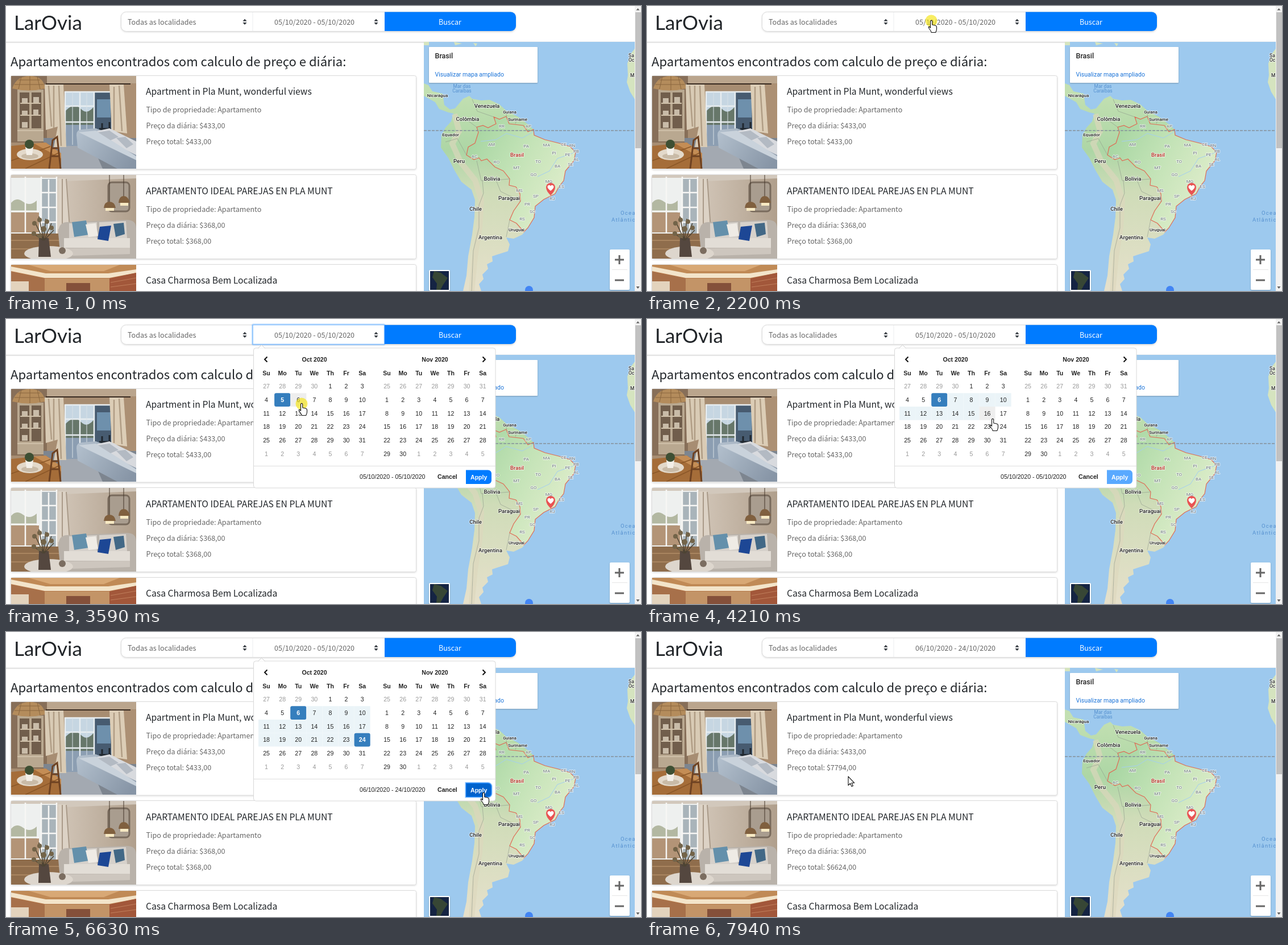
Recreate the animation shown at these times as an HTML page. Size 1117 by 501 pixels, loop 8000 ms.

```html
<!DOCTYPE html>
<html lang="pt">
<head>
<meta charset="utf-8">
<title>Apartamentos</title>
<style>
  html, body { margin: 0; width: 100%; height: 100%; overflow: hidden; background: #fff; }
  svg { display: block; }
  #stage { width: 100%; height: 100%; }
  text { white-space: pre; }
  .page { font: 12.55px "Noto Sans CJK JP", "Noto Sans CJK SC", "Noto Sans CJK KR", sans-serif; fill: #666; }
  .title { font-size: 15.7px; fill: #212529; }
  .card { fill: #fff; stroke: #dcdcdc; filter: drop-shadow(0 1px 1.5px rgba(0,0,0,.14)); }
  .map { font-family: Roboto, sans-serif; text-anchor: middle; }
  .map text { paint-order: stroke; stroke: rgba(255,255,255,.65); stroke-width: 2px; stroke-linejoin: round; }
  .map .plain text { stroke: none; }
  .start { text-anchor: start; }
  .cal { font: 10.6px "Liberation Sans", Arial, sans-serif; fill: #222; }
  .mid { text-anchor: middle; }
  .bold { font-weight: bold; }
  .raised { fill: #fff; filter: drop-shadow(0 1px 1px rgba(0,0,0,.25)); }
</style>
</head>
<body>
<svg id="stage" viewBox="0 0 1117 501">
  <defs>
    <linearGradient id="land" x1="0" y1="150" x2="0" y2="501" gradientUnits="userSpaceOnUse">
      <stop offset="0" stop-color="#c3e0b2"/><stop offset=".3" stop-color="#add6a5"/>
      <stop offset=".5" stop-color="#cfdcb8"/><stop offset="1" stop-color="#e6e0cb"/>
    </linearGradient>
    <linearGradient id="brazil" x1="830" y1="220" x2="985" y2="310" gradientUnits="userSpaceOnUse">
      <stop offset="0" stop-color="#a8d6a3"/><stop offset=".45" stop-color="#c1e2b5"/><stop offset="1" stop-color="#dcecc9"/>
    </linearGradient>
    <linearGradient id="sofa" x1="125" y1="220" x2="215" y2="286" gradientUnits="userSpaceOnUse">
      <stop offset="0" stop-color="#b3c0cd"/><stop offset="1" stop-color="#8795a6"/>
    </linearGradient>
    <linearGradient id="wall" x1="100" y1="0" x2="229" y2="0" gradientUnits="userSpaceOnUse">
      <stop offset="0" stop-color="#d0c4b6"/><stop offset="1" stop-color="#b09f8c"/>
    </linearGradient>
    <path id="updown" d="M-3.6-1.2 0-5.2 3.6-1.2ZM-3.6 1 0 5 3.6 1Z" fill="#343a40"/>
  </defs>
  <rect width="1117" height="501" fill="#fff"/>

  <!-- header -->
  <rect y="62" width="1106" height="3" fill="#e4e4e4"/>
  <rect y="62" width="1106" height="1" fill="#f3f3f3"/>
  <text x="14" y="42" font-family="Lato, sans-serif" font-size="35" fill="#212529">LarOvia</text>
  <rect x="202.5" y="10.5" width="694" height="34" rx="9" class="card"/>
  <path d="M434 11V44" stroke="#eceef0"/>
  <path d="M666 10.500H888a9 9 0 0 1 9 9V35a9 9 0 0 1-9 9H666Z" fill="#007bff"/>
  <g id="focus" fill="none">
    <rect x="433.5" y="9.500" width="232.5" height="35.500" rx="2" stroke="#007bff" stroke-opacity=".25" stroke-width="3"/>
    <rect x="434" y="10.5" width="231.5" height="34" stroke="#80bdff"/>
  </g>
  <use href="#updown" x="420" y="28"/><use href="#updown" x="651" y="28"/>
  <g class="page">
    <text x="214" y="32.5">Todas as localidades</text>
    <text id="date" x="472" y="32.5"></text>
    <text x="761" y="32.5" fill="#fff" font-weight="500">Buscar</text>
    <text x="8" y="106" font-size="22.08" fill="#212529">Apartamentos encontrados com calculo de preço e diária:</text>
  </g>

  <!-- cards -->
  <rect x="8.5" y="122.5" width="713" height="164.5" rx="3" class="card"/>
  <rect x="8.5" y="296.5" width="713" height="148" rx="3" class="card"/>
  <rect x="8.5" y="454.5" width="713" height="80" rx="3" class="card"/>
  <g class="page">
    <text class="title" x="246" y="156">Apartment in Pla Munt, wonderful views</text>
    <text x="246.5" y="187">Tipo de propriedade: Apartamento</text>
    <text x="246.5" y="215">Preço da diária: $433,00</text>
    <text id="total1" x="246.5" y="243"></text>
    <text class="title" x="246" y="331">APARTAMENTO IDEAL PAREJAS EN PLA MUNT</text>
    <text x="246.5" y="362">Tipo de propriedade: Apartamento</text>
    <text x="246.5" y="390">Preço da diária: $368,00</text>
    <text id="total2" x="246.5" y="418"></text>
    <text class="title" x="246" y="488">Casa Charmosa Bem Localizada</text>
  </g>

  <!-- living room with table -->
  <svg x="9" y="123" width="220" height="163" viewBox="9 123 220 163">
    <path d="M9 123H229V286H9Z" fill="#a78d72"/>
    <path d="M9 123H72V240H9Z" fill="#876f59"/>
    <path d="M72 123H229V136H72Z" fill="#baa58d"/>
    <path d="M206 137H229V246H206Z" fill="#ac9074"/>
    <path d="M20 147H66V238H20Z" fill="#b9a890"/>
    <path d="M24 152H41V215H24ZM45 152H62V215H45Z" fill="#715e4c"/>
    <path d="M25 171H61M25 192H61M20 219H66" stroke="#cfc0a9" stroke-width="2"/>
    <path d="M28 170V162H38V170ZM48 170V160H58V170ZM28 191V184H38V191ZM48 191V182H57V191ZM28 214V204H38V214Z" fill="#c8bba8"/>
    <path d="M11 145Q18 123 42 123Q66 123 69 145Q40 152 11 145Z" fill="#b48c5c"/>
    <path d="M15 138H66M22 130H60M27 124 22 146M42 123V148M55 124 60 146" stroke="#8a673f"/>
    <path d="M66 232H229V286H66Z" fill="#7d858f"/>
    <path d="M90 248 150 240 170 286H96Z" fill="#a3a9b1"/>
    <path d="M103 150H186V246H103Z" fill="#c6d6e2"/>
    <path d="M105 184Q120 168 132 181T158 172V216H105Z" fill="#67776a"/>
    <path d="M105 209H156V246H105Z" fill="#8c9eb2"/>
    <path d="M156 152H185V224H156Z" fill="#475b70"/><path d="M160 164H184V196H160Z" fill="#6e90ac"/>
    <path d="M104 150V248M130 150V246M155 150V230M104 151H186M104 176H155M104 204H155" stroke="#e8edf0" stroke-width="2.5"/>
    <path d="M117 151V244M142 151V242" stroke="#d9e1e6"/>
    <path d="M164 216H185M169 206V226M182 204V224" stroke="#20272e" stroke-width="3"/>
    <path d="M68 138H101L106 248H84L91 212 70 218Z" fill="#d9cbb5"/>
    <path d="M182 138H207L213 224 186 220Z" fill="#dccdb6"/>
    <path d="M75 140 80 212M84 140V214M93 140 97 246M190 142V218M199 140 204 220" stroke="#b09d85" stroke-width="2.5"/>
    <path d="M70 137H219" stroke="#37291f" stroke-width="2"/>
    <path d="M124 227Q124 217 134 217L158 215Q190 226 229 257V286H196L126 249Z" fill="url(#sofa)"/>
    <path d="M150 222 182 215 229 238V262L200 248Z" fill="#d8dade"/>
    <path d="M128 222 158 219 229 264V271Z" fill="#c9d2db"/>
    <path d="M162 222 182 219 198 230 184 236ZM194 232 210 230 224 243 212 250Z" fill="#b3bac3"/>
    <path d="M9 246 70 240 97 259V286H9Z" fill="#a56d39"/>
    <path d="M50 242 70 240 97 259V268Z" fill="#c48d55"/>
    <path d="M9 272 78 247M34 286 93 258" stroke="#8a5728" stroke-width="1.5"/>
    <path d="M76 286 82 236 90 230 96 286M81 250H93M80 264H94" fill="none" stroke="#6e4222" stroke-width="3"/>
    <ellipse cx="42" cy="261" rx="23" ry="10" fill="#e3d9ca"/><ellipse cx="42" cy="264" rx="15" ry="5" fill="#c9bba7"/>
    <path d="M34 248H48L46 262H36Z" fill="#f3efe8"/><circle cx="41" cy="243" r="8" fill="#3e4f33"/>
  </svg>

  <!-- living room with pendants -->
  <svg x="9" y="297" width="220" height="147" viewBox="9 297 220 147">
    <path d="M9 297H229V444H9Z" fill="url(#wall)"/>
    <path d="M9 297H229V303L100 308 9 300Z" fill="#d2c8bc"/>
    <path d="M9 302H90V405H9Z" fill="#eef0ef"/>
    <path d="M9 346Q18 335 30 344T54 342V372H9Z" fill="#b3b8a2"/>
    <path d="M9 363H58V398H9Z" fill="#b39477"/><path d="M9 361H58" stroke="#f6f6f4" stroke-width="3"/>
    <path d="M62 304H88V402H62Z" fill="#a9b4ba"/>
    <path d="M34 300V405M62 300V405M75 305V400M89 300V405M62 328H88M62 354H88M62 380H88" stroke="#f7f6f4" stroke-width="2.5"/>
    <path d="M92 303H106L111 392H91Z" fill="#dcd2c5"/>
    <path d="M106 304 112 390M99 304V388" stroke="#a99a89" stroke-width="2"/>
    <path d="M9 400H100V444H9Z" fill="#8f6d4c"/><path d="M9 412H98M9 427H98" stroke="#a98560" stroke-width="2"/>
    <rect x="180" y="310" width="37" height="51" rx="6" fill="#a99d8f" stroke="#796b5d" stroke-width="3"/>
    <path d="M182 297V346M207 297V336" stroke="#433529"/>
    <path d="M172 355Q173 344 182 344T193 355ZM198 346Q199 334 207 334T218 346Z" fill="#80603f"/>
    <path d="M175 355H190V360H175ZM201 346H215V351H201Z" fill="#f7e9c3"/>
    <path d="M92 400Q92 381 106 380L212 376Q229 376 229 391V444H96Z" fill="#b9b2aa"/>
    <path d="M111 382 160 380V409H111ZM164 380 211 378 213 408H164Z" fill="#d6d1cb"/>
    <path d="M102 408H218V425H102Z" fill="#e2ddd6"/>
    <path d="M102 426 218 425V436L118 439Z" fill="#cdc6be"/>
    <path d="M116 380 141 377 146 402 120 406Z" fill="#6490ab"/>
    <path d="M140 384 158 382 162 404 145 406Z" fill="#efebe5"/>
    <path d="M165 388 185 386 180 413 161 410Z" fill="#1d4795"/>
    <path d="M189 383 207 381 209 401 193 406Z" fill="#426886"/>
    <ellipse cx="75" cy="435" rx="43" ry="13" fill="#ddd6cd"/>
    <path d="M58 408H75L79 441H57Z" fill="#54473f"/>
    <path d="M66 412 50 378M66 412 58 370M66 412 70 374M67 412 80 382M67 412 84 394M65 412 46 398" stroke="#4d4433" stroke-width="1.5"/>
    <g fill="#736449"><circle cx="50" cy="382" r="4"/><circle cx="59" cy="376" r="4"/><circle cx="72" cy="379" r="4"/><circle cx="80" cy="390" r="4"/><circle cx="49" cy="400" r="4"/><circle cx="66" cy="392" r="5"/><circle cx="59" cy="404" r="4"/></g>
    <circle cx="99" cy="430" r="6" fill="#7b6d60"/>
  </svg>

  <!-- brick room -->
  <svg x="9" y="455" width="220" height="46" viewBox="9 455 220 46">
    <path d="M9 455H229V501H9Z" fill="#b5784a"/>
    <path d="M9 455H229V463L180 471H70L9 458Z" fill="#c08a56"/>
    <path d="M40 455H200L172 466H78Z" fill="#d8a875"/>
    <path d="M9 458 70 470H180L229 463V469L182 478H68L9 466Z" fill="#f3e4ca"/>
    <path d="M9 467 68 479V501H9Z" fill="#a7704a"/>
    <path d="M68 479H182V501H68Z" fill="#c39467"/>
    <path d="M182 479 229 469V501H182Z" fill="#a2573a"/>
    <path d="M106 487H148V501H106Z" fill="#84503a"/>
    <path d="M9 484H40V501H9Z" fill="#e3d3bd"/>
    <path d="M184 486 229 478M184 494 229 488" stroke="#c07f5c"/>
  </svg>

  <!-- map -->
  <svg x="735" y="63" width="371" height="438" viewBox="735 63 371 438" class="map">
    <path d="M735 63H1106V501H735Z" fill="#9dc9ee"/>
    <path d="M735 136 743 139 750 150 768 154 771 174 781 182 790 180 804 163 815 158 820 163 836 166 851 165 868 173 880 184 901 195 917 207 928 217 929 227 948 235 972 241 992 247 1002 257 999 272 984 290 981 307 973 317 966 330 946 340 931 352 929 372 918 390 908 402 893 409 880 407 886 419 883 431 864 437 855 440 856 449 846 454 848 462 838 472 840 480 832 489 836 501H804L810 474 813 440 820 402 824 371 825 341 819 323 801 309 789 289 778 267 765 249 766 227 773 214 783 203 787 189 778 187 762 181 755 169 735 158Z" fill="url(#land)"/>
    <path d="M735 63H744V69H735ZM788 63 802 66 790 69ZM822 65 829 66 826 71ZM1106 75 1099 84 1093 101 1094 122 1092 134 1098 151 1106 164Z" fill="#d5e4bf"/>
    <path d="M789 190 797 220 785 242 800 275 825 306 836 340 833 390 825 440 819 501" fill="none" stroke="#ddd8bd" stroke-width="10" stroke-opacity=".65"/>
    <path d="M928 217 918 221 910 210 885 207 880 194 868 199 858 195 862 207 848 214 839 210 828 213 831 222 825 241 813 248 810 262 823 270 832 267 836 272 846 269 860 283 875 290 886 304 885 315 897 318 904 330 905 343 893 360 886 376 898 382 911 397 918 390 929 372 931 352 946 340 966 330 973 317 981 307 984 290 999 272 1002 257 992 247 972 241 948 235 929 227Z" fill="url(#brazil)" stroke="#df6c56" stroke-width="1.2"/>
    <path d="M835 238 862 235 880 224 908 232 928 221M1002 257 970 268 956 290 935 300" fill="none" stroke="#a4cff0"/>
    <path d="M805 196 828 213M820 164 829 185 858 195M881 186 880 196M899 197 896 207M773 239 794 233 810 262M828 272 833 294 836 307 862 306 886 304M838 307 840 329 832 350 832 390 822 430 819 501M862 306 870 326 905 343M886 376 880 406" fill="none" stroke="#8d978a" stroke-width=".8" stroke-opacity=".75"/>
    <path d="M735 219H1106" stroke="#85929a" stroke-width="1.3" stroke-dasharray="5 2"/>
    <g id="countries" font-weight="500" fill="#222"></g>
    <g id="states" font-size="8" fill="#68737a"></g>
    <text x="899" y="265" font-size="9.5" font-weight="500" fill="#b5271d">Brasil</text>
    <g class="plain" font-size="8.5" fill="#5590cf">
      <text x="802" y="144">Mar das</text><text x="802" y="152">Caraíbas</text>
      <g class="start" font-size="9.5" letter-spacing="1.3"><text x="1081" y="367">Oceano</text><text x="1065" y="379">Atlântico</text></g>
    </g>
    <g class="start" font-size="8.5" font-weight="500" fill="#333"><text x="1095" y="90">Sa</text><text x="1095" y="98">Oc</text><text x="1098" y="125">Ma</text></g>
    <path d="M958 333Q950 325 950 319A8 8 0 0 1 966 319Q966 325 958 333Z" fill="#e95353"/>
    <path d="M958 325Q952 320 952.500 317.500A2.900 2.900 0 0 1 958 316.500A2.900 2.900 0 0 1 963.500 317.500Q964 320 958 325Z" fill="#fff"/>
    <rect x="744" y="72" width="191" height="63" rx="1" class="raised"/>
    <g class="plain start">
      <text x="754.5" y="92" font-size="12.5" font-weight="500" fill="#222">Brasil</text>
      <text x="754.5" y="123.5" font-size="10.55" fill="#1a73d8">Visualizar mapa ampliado</text>
    </g>
    <rect x="744" y="464" width="37" height="37" rx="2" class="raised"/>
    <path d="M746 466H779V499H746Z" fill="#152443"/>
    <path d="M753 466 765 469 777 478 769 490 764 499H757L758 488 750 477Z" fill="#374635"/>
    <rect x="1062" y="428" width="35" height="71" rx="2" class="raised"/>
    <path d="M1066 463.500H1093" stroke="#e6e6e6"/>
    <path d="M1071 446H1087M1079 438V454M1071 482H1087" stroke="#666" stroke-width="3"/>
    <circle cx="920" cy="499" r="7" fill="#4285f4"/>
  </svg>

  <!-- scrollbar -->
  <path d="M1106 0H1117V501H1106Z" fill="#f1f1f1"/>
  <path d="M1107 11H1117V250H1107Z" fill="#c1c1c1"/>
  <path d="M1108.500 7.500 1111.500 4 1114.500 7.500ZM1108.500 493 1111.500 497 1114.500 493Z" fill="#606060"/>

  <!-- date picker -->
  <g id="picker" class="cal">
    <rect x="435.5" y="51" width="425.5" height="246" rx="4" fill="#fff" stroke="#d8d8d8"/>
    <path d="M443.500 51.500 449.500 45.500 455.500 51.500" fill="#fff" stroke="#d0d0d0"/>
    <path d="M436 258.500H861" stroke="#ddd"/>
    <path d="M459.500 66.500 455 71 459.500 75.500M838.500 66.500 843 71 838.500 75.500" fill="none" stroke="#111" stroke-width="2"/>
    <g class="mid bold"><text x="542.5" y="75">Oct 2020</text><text x="754.5" y="75">Nov 2020</text></g>
    <g id="days" class="mid"></g>
    <text id="range" x="622" y="281"></text>
    <text class="bold" x="759" y="281">Cancel</text>
    <path id="apply" d="M809 265.500H848a6 6 0 0 1 6 6V284a6 6 0 0 1-6 6H809Z" stroke-opacity=".5" stroke-width="3"/>
    <text class="bold" x="817" y="281.5" fill="#fff">Apply</text>
  </g>

  <circle id="click" r="10.5" fill="#f4e30f" fill-opacity=".65"/>
  <path id="pointer" fill="#fff" stroke="#111" stroke-width="1.1" stroke-linejoin="round"/>
</svg>

<script>
const $ = id => document.getElementById(id);

function add(parent, tag, attrs, content = "") {
  const el = document.createElementNS("http://www.w3.org/2000/svg", tag);
  for (const name in attrs) el.setAttribute(name, attrs[name]);
  el.textContent = content;
  return parent.appendChild(el);
}
const set = (id, name, value) => $(id).setAttribute(name, value);
const show = (id, on) => set(id, "visibility", on ? "visible" : "hidden");

// Map labels: name, centre x, centre y, optional size
const countries = `Venezuela 846 176,Colômbia 812 199,Guiana 886 186 7.5,Suriname 900 199 8,Equador 782 226 8,
Nicarágua 759 157 8,Peru 797 273,Bolívia 855 304,Paraguai 885 338,Chile 826 357,Argentina 852 407,Uruguai 898 393 8`;
const states = `RR 872 211,AP 919 211,AM 854 243,PA 915 246,MA 951 244,CE 981 243,RN 996 245,PI 964 258,PB 1003 255,
PE 988 261,AL 1003 269,SE 993 278,TO 936 273,AC 824 264,RO 863 274,MT 898 284,BA 970 281,GO 928 296,MG 955 308,
ES 977 317,MS 903 324,SP 932 334,RJ 961 338,PR 917 348,SC 926 361,RS 908 374`;
function addLabels(id, list, defaultSize) {
  for (const item of list.split(",")) {
    const [name, x, y, size = defaultSize] = item.trim().split(" ");
    add($(id), "text", { x, y: +y + size * 0.36, "font-size": size }, name);
  }
}
addLabels("countries", countries, 9.6);
addLabels("states", states, 8);

// Calendar months: left edge, first date shown, index range inside the month
const COL = 28.1, ROW = 23.7, TOP = 106.6;
const months = [
  { left: 444, first: [8, 27], from: 4, to: 35 },
  { left: 656, first: [9, 25], from: 7, to: 37 }
];
const cells = [];
for (const { left, first, from, to } of months) {
  ["Su", "Mo", "Tu", "We", "Th", "Fr", "Sa"].forEach((name, i) =>
    add($("days"), "text", { x: left + COL * (i + 0.5), y: 98.5, class: "bold" }, name));
  for (let i = 0; i < 42; i++) {
    const x = left + COL * (i % 7), y = TOP + ROW * Math.floor(i / 7);
    const box = add($("days"), "rect", { x, y, width: COL, height: ROW });
    const day = new Date(2020, first[0], first[1] + i).getDate();
    const label = add($("days"), "text", { x: x + COL / 2, y: y + 15.6 }, day);
    cells.push({ x, y, box, label, off: i < from || i >= to });
  }
}

const inside = (p, x, y, w, h) => p.x >= x && p.x < x + w && p.y >= y && p.y < y + h;
const between = (t, a, b) => t >= a && t < b;

// Pointer moves: start, end, steps, target x, y, optional bend x, y
const moves = [
  [460, 1200, 11, 564, 146, 900, 260],
  [1280, 1820, 8, 500, 26],
  [2750, 2750, 1, 504, 29],
  [2827, 3290, 7, 520, 149],
  [4060, 4210, 3, 608, 176],
  [4310, 4460, 3, 635, 191],
  [5700, 6120, 6, 876, 278],
  [6170, 6320, 3, 840, 283],
  [6950, 7710, 11, 306, 239, 570, 150],
  [7790, 7940, 3, 354, 254]
];
function pointerAt(t) {
  let x = 1112, y = 505;
  for (const [start, end, steps, tx, ty, bx = (x + tx) / 2, by = (y + ty) / 2] of moves) {
    if (t < start) break;
    const part = Math.min(1, (t - start) / (end - start || 1));
    const u = (Math.floor(part * (steps - 1) + 1e-6) + 1) / steps;
    const e = u * u * (3 - 2 * u);
    const bend = (a, b, c) => (1 - e) ** 2 * a + 2 * e * (1 - e) * b + e * e * c;
    [x, y] = [bend(x, bx, tx), bend(y, by, ty)];
  }
  return { x, y };
}

const clicks = [[2200, 2440], [3590, 3740], [5080, 5230], [6550, 6630]];
const ARROW = "M0 0V15.5L3.6 12.2 6 17.6 8.4 16.5 6 11.3H10.8Z";
const HAND = "M-1.5 1a1.6 1.6 0 0 1 3.2 0V7l4.800 1q3 .6 3 3v3.500q0 2.500-1.800 6H.3q-.8-3-3.800-6.500-2.200-3.200-.6-3.600 1.200-.2 2.600 2Z";
const OLD = "05/10/2020 - 05/10/2020", NEW = "06/10/2020 - 24/10/2020";

function render(t) {
  const p = pointerAt(t);
  const open = between(t, 2370, 6720), picking = between(t, 3660, 5080);
  const picked = t >= 5080, done = t >= 6720;
  const hover = open ? cells.findIndex(c => inside(p, c.x, c.y, COL, ROW)) : -1;
  const onApply = open && inside(p, 809, 265, 45, 25);

  $("date").textContent = done ? NEW : OLD;
  $("range").textContent = picked ? NEW : OLD;
  $("total1").textContent = `Preço total: $${done ? 7794 : 433},00`;
  $("total2").textContent = `Preço total: $${done ? 6624 : 368},00`;
  show("focus", between(t, 2290, 3660));
  show("picker", open);

  const first = t < 3660 ? 8 : 9;
  const last = picked ? 27 : picking ? hover : first;
  cells.forEach((c, i) => {
    const active = i === first || (picked && i === last);
    const fill = active ? "#357ebd" : i === hover ? "#eee" : i > first && i <= last ? "#ebf4f8" : "none";
    c.box.setAttribute("fill", fill);
    c.box.setAttribute("rx", active ? 3 : 0);
    c.label.setAttribute("fill", active ? "#fff" : c.off ? "#999" : "#222");
    c.label.setAttribute("class", active ? "bold" : "");
  });
  set("apply", "fill", picking ? "#59a9ff" : onApply ? "#0062cc" : "#007bff");
  set("apply", "stroke", t >= 6550 ? "#007bff" : "none");

  const at = `translate(${p.x} ${p.y})`;
  const onDate = inside(p, 434, 11, 232, 33);
  set("click", "transform", at);
  show("click", clicks.some(([a, b]) => between(t, a, b)));
  set("pointer", "transform", at);
  set("pointer", "d", onDate || hover >= 0 || onApply ? HAND : ARROW);
  show("pointer", t >= 460);
}

function frame(now) {
  render(now % 8000);
  requestAnimationFrame(frame);
}
requestAnimationFrame(frame);
</script>
</body>
</html>
```
